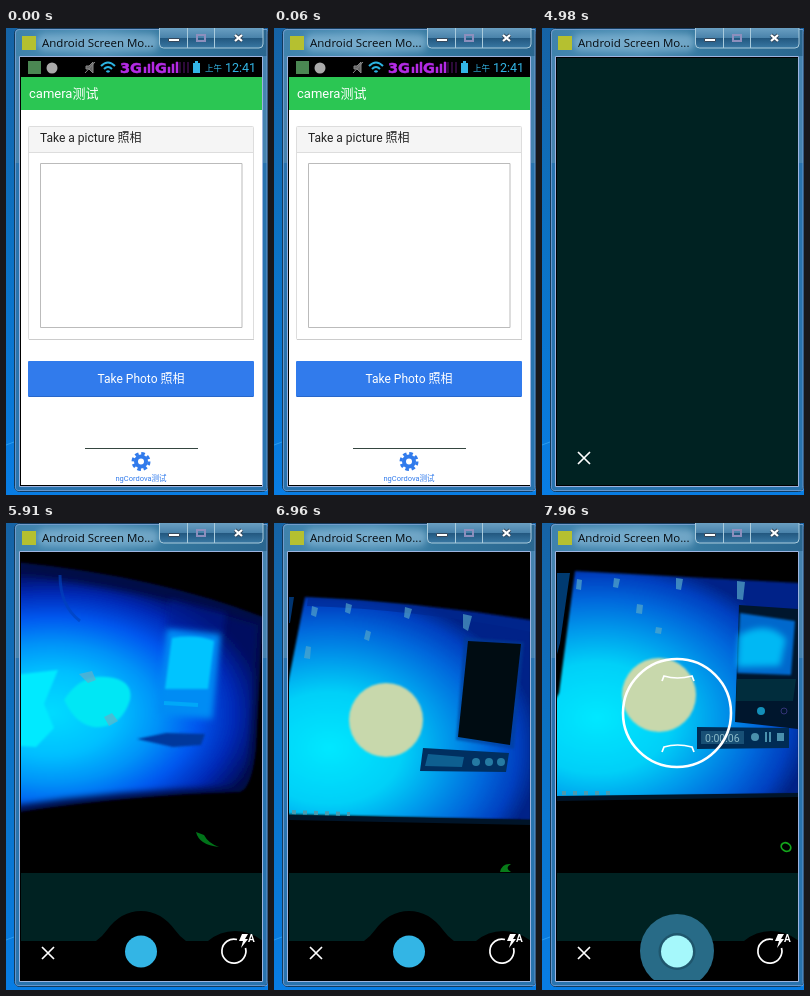
An HTML page that plays this animation: 262x467 px, repeating every 8 s.

```html
<!DOCTYPE html>
<html lang="zh">
<head>
<meta charset="utf-8">
<title>Camera test</title>
<style>
html, body { margin: 0; width: 100%; height: 100%; overflow: hidden; background: #0877d4; }
svg { display: block; width: 262px; height: 467px; }
text { font-family: Roboto, "Noto Sans CJK SC", "Noto Sans CJK", sans-serif; }
.title { font: 11.5px "Open Sans", sans-serif; }
.net { font: bold 14.5px "DejaVu Sans", sans-serif; }
.mid { text-anchor: middle; }
.line { fill: none; stroke: #fff; stroke-width: 1.7; }
.scene { display: none; }
</style>
</head>
<body>
<svg viewBox="0 0 262 467">
  <defs>
    <linearGradient id="desk" x2="0" y2="1">
      <stop stop-color="#1663a5"/><stop offset=".45" stop-color="#0b72c4"/><stop offset="1" stop-color="#087de4"/>
    </linearGradient>
    <linearGradient id="bar">
      <stop stop-color="#3f82ac"/><stop offset=".35" stop-color="#4f90b6"/><stop offset=".6" stop-color="#35789f"/><stop offset="1" stop-color="#2a668f"/>
    </linearGradient>
    <linearGradient id="button" x2="0" y2="1">
      <stop stop-color="#6a9fc2"/><stop offset=".48" stop-color="#4a83ab"/><stop offset=".5" stop-color="#22577f"/><stop offset="1" stop-color="#3978a3"/>
    </linearGradient>
    <radialGradient id="blurFill" gradientUnits="userSpaceOnUse" cx="0" cy="0" r="1" gradientTransform="translate(45 190) scale(215 140)">
      <stop stop-color="#00dcff"/><stop offset=".3" stop-color="#00c0ff"/><stop offset=".5" stop-color="#0092f8"/>
      <stop offset=".68" stop-color="#0058f0"/><stop offset=".85" stop-color="#002ab8"/><stop offset="1" stop-color="#000e60"/>
    </radialGradient>
    <radialGradient id="sharpFill" gradientUnits="userSpaceOnUse" cx="0" cy="0" r="1" gradientTransform="translate(55 225) scale(210 160)">
      <stop stop-color="#00e8ff"/><stop offset=".35" stop-color="#00d0f8"/><stop offset=".55" stop-color="#009cec"/>
      <stop offset=".75" stop-color="#0068dc"/><stop offset=".9" stop-color="#0040c0"/><stop offset="1" stop-color="#002488"/>
    </radialGradient>
    <radialGradient id="nearFill" href="#sharpFill" gradientTransform="translate(55 195) scale(215 158)"/>
    <filter id="soft" x="-30%" y="-30%" width="160%" height="160%"><feGaussianBlur stdDeviation="3"/></filter>
    <filter id="edge"><feGaussianBlur stdDeviation="1"/></filter>
    <clipPath id="view"><path d="M15 30H256V457H15Z"/></clipPath>
    <g id="signal"><path d="M0 11V5h2v6M4 11V2h2v9M8 11V0h2v11"/></g>
    <g id="wifi" fill="none" stroke-width="2">
      <path d="M0 4Q7-3 14 4M3 7q4-4 8 0M5.5 10q1.5-1.5 3 0"/>
    </g>
    <g id="cross"><path class="line" d="M36 424l12 12m0-12l-12 12"/></g>
  </defs>

  <!-- window -->
  <path fill="url(#desk)" d="M0 0H262V467H0Z"/>
  <path d="M0 417l8-3" stroke="#2a9cf0"/>
  <rect x="8.5" y=".5" width="253" height="463" rx="5" fill="#2873ae" stroke="#123a5c"/>
  <path d="M9 135V5q0-4 4-4H261V135Z" fill="#4583af"/>
  <path d="M10 28V5q0-3 3-3H261V28Z" fill="url(#bar)"/>
  <path d="M9.5 460V5q0-3.500 3.500-3.500H261V462.500H12q-2.500 0-2.500-2.500" fill="none" stroke="#8faee0" opacity=".6"/>
  <rect x="31" y="6" width="122" height="17" rx="8" fill="#92bfdb" opacity=".6" filter="url(#soft)"/>
  <rect x="16" y="8" width="14" height="14" fill="#b5c030"/>
  <text class="title" x="36" y="19" fill="#050b10">Android Screen Mo...</text>
  <path d="M153.500 0V16q0 4 4 4H253q4 0 4-4V0" fill="url(#button)" stroke="#a9cbdc"/>
  <path d="M181.500 0V20M208.500 0V20" stroke="#a9cbdc"/>
  <path d="M162.500 10.500h11v3h-11z" fill="#fff" stroke="#34485c"/>
  <path d="M191 7h8v6h-8z" fill="none" stroke="#8d8fbd" stroke-width="2"/>
  <path d="M229 7l7 6m0-6l-7 6" stroke="#34485c" stroke-width="4"/>
  <path d="M229 7l7 6m0-6l-7 6" stroke="#fff" stroke-width="2.300"/>
  <path d="M13.500 28.500H256.500V458.500H13.500Z" fill="#000" stroke="#9db4e0"/>

  <g clip-path="url(#view)">
    <g class="scene" id="app">
      <path fill="#fff" d="M14 49H257V458H14Z"/>
      <rect x="22" y="33" width="13" height="13" fill="#4b8753"/>
      <circle cx="46" cy="40" r="5.500" fill="#aaa"/>
      <path d="M80 38h3l4-4v11l-4-4h-3zM79 45l10-11" fill="#666" stroke="#888"/>
      <use href="#wifi" x="95" y="34" stroke="#2cb4e2"/>
      <g fill="#b42be5" stroke="#b42be5" stroke-width=".5">
        <text class="net" x="114" y="45">3G</text>
        <use href="#signal" x="138" y="34"/>
        <text class="net" x="149" y="45">G</text>
        <use href="#signal" x="162" y="34"/>
        <path d="M174 34v11M178 34v11M182 34v11"/>
      </g>
      <path d="M187 35h2v-2h3v2h2v10h-7z" fill="#33b5e5"/>
      <g fill="#33b5e5"><text x="199" y="43" font-size="8.500">上午</text><text x="219" y="44" font-size="12.500">12:41</text></g>
      <path fill="#2bc653" d="M14 49H257V82H14Z"/>
      <text x="23" y="70" font-size="13" fill="#fff">camera测试</text>
      <rect x="22.500" y="98.500" width="225" height="213" rx="1" fill="#fff" stroke="#ddd"/>
      <path d="M23 99H247V124H23Z" fill="#f5f5f5"/>
      <path d="M23 124.500H247" stroke="#ddd"/>
      <path d="M23 311.500H248" stroke="#ccc"/>
      <text x="34" y="114" font-size="12" fill="#222">Take a picture 照相</text>
      <path d="M34.500 135.500H236V299.500H34.500Z" fill="#fff" stroke="#bbb"/>
      <rect x="22" y="333" width="226" height="36" rx="1" fill="#317bec"/>
      <path d="M23 368.500H247" stroke="#2867ca"/>
      <text class="mid" x="135" y="354.500" font-size="12" fill="#fff">Take Photo 照相</text>
      <path d="M79 420.500H192" stroke="#354640"/>
      <circle cx="135" cy="433.500" r="5" fill="none" stroke="#317bec" stroke-width="4"/>
      <circle cx="135" cy="433.500" r="8" fill="none" stroke="#317bec" stroke-width="3" stroke-dasharray="3.600 2.683"/>
      <text class="mid" x="135" y="453" font-size="7.500" fill="#317bec">ngCordova测试</text>
    </g>

    <g class="scene" id="wait">
      <path d="M14 30H257V458H14Z" fill="#022"/>
      <use href="#cross"/>
    </g>
    <g class="scene" id="fade">
      <path d="M14 30H257V47H14Z"/>
      <path d="M42 34l8 7m0-7l-8 7M60 36h10l-2 4H59zM24 35v5" stroke="#063434" fill="none"/>
      <use href="#wifi" x="95" y="32" stroke="#064044"/>
      <g fill="#063434"><text class="net" x="114" y="42">3G</text><use href="#signal" x="139" y="31"/></g>
      <path d="M187 33h2v-2h3v2h2v9h-7z" fill="#177696"/>
      <g fill="#177696"><text x="199" y="41" font-size="8.500">上午</text><text x="219" y="41" font-size="12.500">12:41</text></g>
    </g>

    <!-- live preview, out of focus -->
    <g class="scene" id="blur">
      <path d="M0 38Q150 52 257 94L250 225Q246 265 234 269Q120 272 0 291Z" fill="#000d47" filter="url(#edge)"/>
      <path d="M0 50Q130 64 252 102L243 235Q238 262 222 264Q110 267 0 284Z" fill="url(#blurFill)" filter="url(#soft)"/>
      <path d="M54 52q0 31 20 46" fill="none" stroke="#0043bc" stroke-width="3" opacity=".65"/>
      <path d="M164 76L220 90 217 112 160 106Z" fill="#001f94" opacity=".55" filter="url(#soft)"/>
      <path d="M161 106L215 111 206 196 152 191Z" fill="#008cf4" filter="url(#soft)"/>
      <path d="M166 115Q190 111 208 118L202 166 159 166Z" fill="#00c4ff" filter="url(#edge)"/>
      <path d="M158 180l34 2" stroke="#00a8f8" stroke-width="4"/>
      <path d="M58 177Q74 151 101 154T124 177Q116 202 94 204T58 177" fill="#00e7f5" filter="url(#edge)"/>
      <path d="M0 153L52 147 38 181 48 205 30 224 0 222Z" fill="#00eaff" filter="url(#edge)"/>
      <path d="M73 151l13-3 4 9-8 3zM98 194l8-4 6 8-9 5z" fill="#65aec8" opacity=".7"/>
      <path d="M131 216l29-6 39 1-4 11-28 2z" fill="#00379c" filter="url(#edge)"/>
      <path d="M190 309q3 13 23 15q-11-4-15-12z" fill="#092" opacity=".75"/>
    </g>

    <!-- live preview, sharp -->
    <g class="scene" id="sharp">
      <path d="M14 74H20L16 100H14Z" fill="#003470"/>
      <path d="M31 74Q145 79 257 97V297L0 291V250L14 160Z" fill="url(#sharpFill)" filter="url(#edge)"/>
      <path d="M34 75Q145 80 257 99V109Q150 87 33 83Z" fill="#00278e" opacity=".6"/>
      <path d="M38 83l6 2-2 9-5-2zM72 80l6 2-2 9-5-2zM131 84l7 2-3 10-5-2zM189 91l9 2-4 15-5-3zM92 107l5 2-2 9-5-2zM32 123l5 1-1 12-6-1zM110 130l6 2" fill="#58a8c8" opacity=".65"/>
      <circle cx="112" cy="197" r="37" fill="#c8d8ac" filter="url(#edge)"/>
      <path d="M190 114L250 119 240 226 182 217Z" fill="#003c94" opacity=".6" filter="url(#edge)"/>
      <path d="M194 118L247 121 236 222 184 214Z" fill="#000c12"/>
      <path d="M149 225L235 230 232 249 146 248Z" fill="#002f60"/>
      <path d="M154 231L190 234 188 244 151 243Z" fill="#0e5f90"/>
      <g fill="#257aa3"><circle cx="202" cy="239" r="4"/><circle cx="215" cy="239" r="4"/><circle cx="227" cy="239" r="4"/></g>
      <path d="M18 289l58 2" stroke="#4b9bb0" stroke-width="4" stroke-dasharray="4 7"/>
      <path d="M14 292L257 297V302L14 297Z" fill="#001428"/>
      <path d="M226 349q2-9 11-8q-7 4 0 8z" fill="#087c19"/>
    </g>

    <!-- live preview, closer -->
    <g class="scene" id="near">
      <path d="M14 50H28L18 120 14 135Z" fill="#003a70"/>
      <path d="M33 48L257 60V271L0 275V200L17 170Z" fill="url(#nearFill)" filter="url(#edge)"/>
      <path d="M72 55l6 1-2 9-5-1zM134 55l7 1-2 11-5-1zM195 58l8 1-2 18-6-1zM95 81l6 1-1 9-6-1zM35 56l5 1-1 10-5-1zM114 104l6 1-1 6-6-1z" fill="#58a8c8" opacity=".7"/>
      <path d="M197 82L257 86V206L193 199Z" fill="#00162d"/>
      <path d="M198 90L253 98 249 152 195 150Z" fill="#0068cc" filter="url(#edge)"/>
      <path d="M197 112Q226 96 244 116L238 143 195 144Z" fill="#00b8f4" filter="url(#soft)"/>
      <path d="M195 156H254L251 178H194Z" fill="#012d3d"/>
      <circle cx="219" cy="188" r="4" fill="#138fb9"/><circle cx="242" cy="188" r="3" fill="none" stroke="#337"/>
      <circle cx="117" cy="172" r="37" fill="#c8d8ac" filter="url(#edge)"/>
      <path d="M155 204L247 205V225L155 226Z" fill="#002c54"/>
      <path d="M159 208H202V221H159Z" fill="#185076"/>
      <text x="163" y="219" font-size="10.500" fill="#8abac8">0:00:06</text>
      <circle cx="213" cy="214" r="4" fill="#4a91ad"/>
      <path d="M224 209v10m4-10v10" stroke="#4a91ad" stroke-width="2"/><path d="M235 210h7v8h-7z" fill="#4a91ad"/>
      <path d="M20 270h52" stroke="#4b9bb0" stroke-width="4" stroke-dasharray="4 7"/>
      <path d="M14 273L257 270V274L14 278Z" fill="#001428"/>
      <ellipse cx="244" cy="324" rx="5" ry="4" transform="rotate(30 244 324)" fill="none" stroke="#13a51b" stroke-width="1.800"/>
    </g>

    <g class="scene" id="controls">
      <path d="M14 350H257V418H14Z" fill="#022"/>
      <path d="M14 418H202Q214 408 229 408T257 418V458H14Z"/>
      <use href="#cross"/>
      <path class="line" stroke-width="2" d="M231 416.500A12 12 0 1 0 239.500 425"/>
      <path d="M236 411h6l-3 5h3l-7 9 2-7h-4z" fill="#fff"/>
      <text x="242" y="419" font-size="10" font-weight="bold" fill="#fff">A</text>
    </g>
    <g class="scene" id="idle">
      <path d="M90 418Q96 414 101 407Q115 388 135 388T169 407Q174 414 180 418Z"/>
      <circle cx="135" cy="428.500" r="16" fill="#33b5e5"/>
    </g>
    <g class="scene" id="press">
      <circle cx="135" cy="428" r="37" fill="#286b87"/>
      <circle cx="135" cy="428.500" r="18.500" fill="#1f566d"/>
      <circle cx="135" cy="428.500" r="16" fill="#a5f8fb"/>
    </g>
    <g class="scene" id="focus">
      <circle class="line" cx="135" cy="190" r="54" style="stroke-width:2.600"/>
      <path class="line" d="M120 158l2-5q13 4 28 0l2 5M120 229l2-5q13-4 28 0l2 5"/>
    </g>
  </g>
</svg>
<script>
const cues = [
  [0, "app"],
  [4920, "wait fade"],
  [4980, "wait"],
  [5910, "blur controls idle"],
  [6900, "sharp controls idle"],
  [7960, "near controls press focus"]
];
const scenes = document.querySelectorAll(".scene");

function draw(now) {
  const time = now % 8000;
  const active = cues.findLast(([start]) => time >= start)[1].split(" ");
  for (const scene of scenes) scene.style.display = active.includes(scene.id) ? "inline" : "none";
  requestAnimationFrame(draw);
}
draw(0);
</script>
</body>
</html>
```
